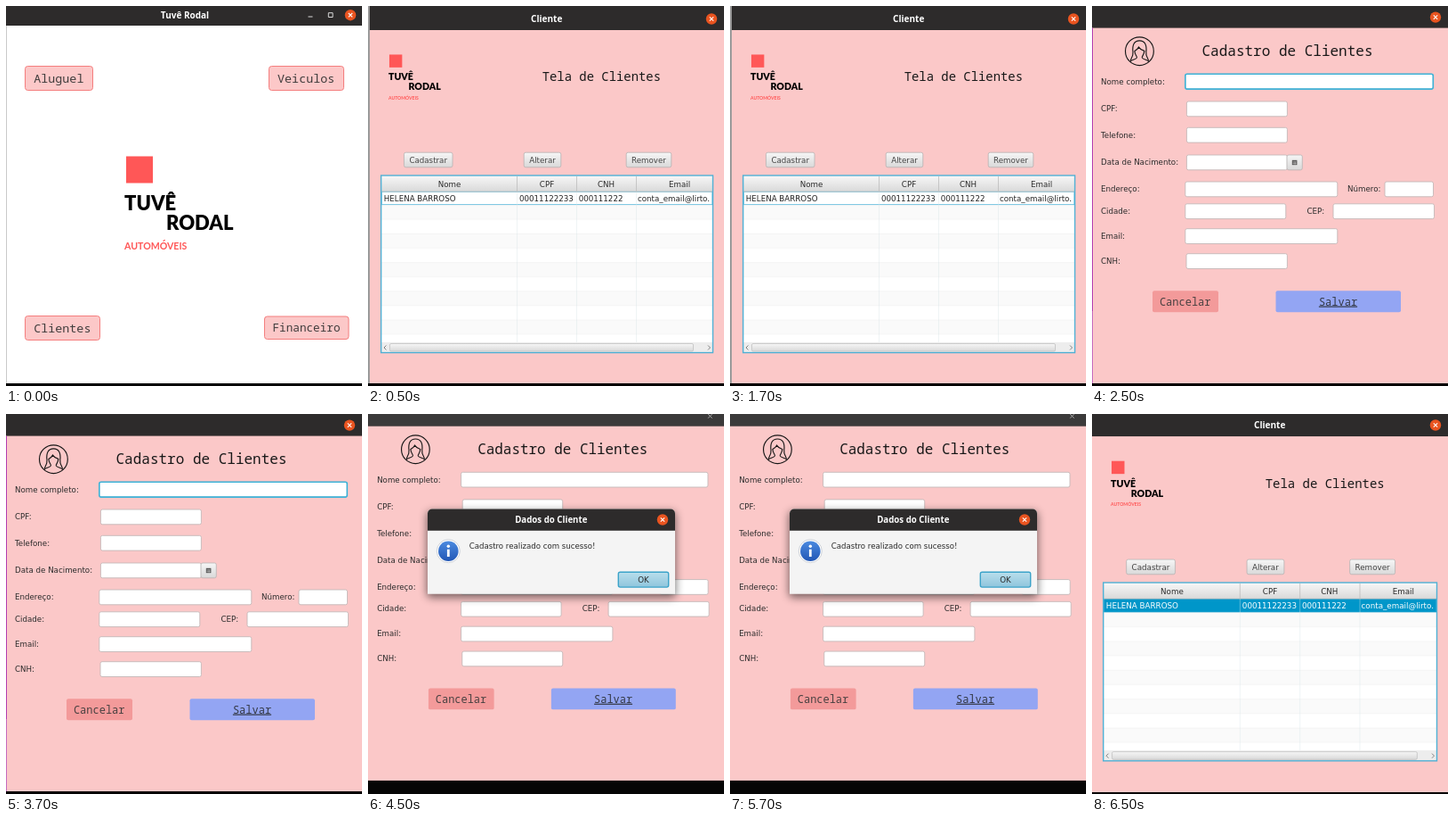
These frames come from a looping animation (400 px wide and 426 px high, 8000 ms). An HTML page:

```html
<!DOCTYPE html>
<html lang="pt-BR">
<head>
<meta charset="utf-8">
<title>Locadora</title>
<style>
  html, body { margin: 0; width: 100%; height: 100%; overflow: hidden; background: #000; }
  svg.stage { display: block; width: 100vw; height: 100vh; }
  text { font: 8.7px "DejaVu Sans", sans-serif; fill: #2a2a2a; }
  .title { font: bold 10px "Open Sans", sans-serif; fill: #fff; }
  .mono { font-family: "Noto Sans Mono", monospace; fill: #181818; }
  .brand { font: 900 22px Lato, sans-serif; fill: #000; }
  .tag { font: 700 10.6px Lato, sans-serif; fill: #ff5757; }
  .mid text, text.mid { text-anchor: middle; }
  .menu rect { fill: #fcc8c8; stroke: #f47e7e; }
  .menu text { font-size: 13.4px; fill: #403c3c; }
  .tool rect { fill: url(#grey); stroke: #b7b3b3; stroke-width: .8; }
  .tool text { fill: #444; }
  .field rect { fill: #fff; stroke: #c4b8b8; stroke-width: .9; }
  .cell { fill: currentColor; }

  .scene { visibility: hidden; animation: 8s step-end infinite; }
  #home { animation-name: home; }
  #list { animation-name: list; color: #222; --row: #fff; --edge: #6cc0de; }
  #entry { animation-name: entry; --bar: #2d2b2b; }
  #done { animation-name: done; --bar: #3b3a3a; }
  #picked { animation-name: picked; color: #fff; --row: #0096c9; --edge: #0096c9; }
  @keyframes home { 0% { visibility: visible } 6.25%, 100% { visibility: hidden } }
  @keyframes list { 0% { visibility: hidden } 6.25% { visibility: visible } 31.25%, 100% { visibility: hidden } }
  @keyframes entry { 0% { visibility: hidden } 31.25% { visibility: visible } 56.25%, 100% { visibility: hidden } }
  @keyframes done { 0% { visibility: hidden } 56.25% { visibility: visible } 81.25%, 100% { visibility: hidden } }
  @keyframes picked { 0% { visibility: hidden } 81.25%, 100% { visibility: visible } }
</style>
</head>
<body>
<svg class="stage" viewBox="0 0 400 426" preserveAspectRatio="none">
  <defs>
    <linearGradient id="grey" x2="0" y2="1"><stop stop-color="#f6f6f6"/><stop offset="1" stop-color="#d9d9d9"/></linearGradient>
    <linearGradient id="sky" x2="0" y2="1"><stop stop-color="#b9deec"/><stop offset="1" stop-color="#8fc5dc"/></linearGradient>
    <linearGradient id="info" x2="0" y2="1"><stop stop-color="#4b8ae0"/><stop offset="1" stop-color="#2257b5"/></linearGradient>
    <filter id="shade" x="-20%" y="-30%" width="140%" height="170%"><feGaussianBlur stdDeviation="5"/></filter>
    <pattern id="rows" x="0" y="222.8" width="400" height="32.2" patternUnits="userSpaceOnUse">
      <rect width="400" height="32.2" fill="#fff"/>
      <rect width="400" height="16.1" fill="#fafafa"/>
      <path d="M0 .3H400M0 16.4H400" stroke="#efefef" stroke-width=".7"/>
    </pattern>
    <clipPath id="grid"><rect x="15" y="191" width="372" height="197"/></clipPath>

    <g id="close">
      <circle r="6.2" fill="#e95420"/>
      <path d="M-2.2-2.2 2.2 2.2M2.2-2.2-2.2 2.2" stroke="#fff" stroke-width="1.1"/>
    </g>

    <g id="logo">
      <rect x="135" y="168.5" width="30" height="30" fill="#ff5757"/>
      <text class="brand" x="133" y="229">TUVÊ</text>
      <text class="brand" x="180" y="251">RODAL</text>
      <text class="tag" x="133" y="273">AUTOMÓVEIS</text>
    </g>

    <g id="clients">
      <rect x="2" width="400" height="423" fill="#fbc8c8"/>
      <rect x="2" width="400" height="27" fill="#2d2b2b"/>
      <text class="title mid" x="200.7" y="18">Cliente</text>
      <use href="#close" x="386" y="14.5"/>
      <use href="#logo" transform="translate(23 83.5) scale(.48) translate(-133 -229)"/>
      <text class="mono" x="195.7" y="84.3" style="font-size:13.9px">Tela de Clientes</text>
      <g class="tool mid">
        <rect x="40.5" y="164.2" width="54.5" height="16.6" rx="2"/><text x="67.7" y="175.8">Cadastrar</text>
        <rect x="175.2" y="164.2" width="41.6" height="16.6" rx="2"/><text x="196" y="175.8">Alterar</text>
        <rect x="290.2" y="164.2" width="50.6" height="16.6" rx="2"/><text x="315.5" y="175.8">Remover</text>
      </g>
      <rect x="14.5" y="190" width="373" height="198.5" fill="url(#rows)"/>
      <g clip-path="url(#grid)">
        <rect x="15" y="191" width="373" height="17" fill="url(#grey)"/>
        <rect x="15.6" y="208.3" width="371.2" height="14.3" fill="var(--row)" stroke="var(--edge)" stroke-width=".9"/>
        <path d="M167.5 208V377M234.5 208V377M301.5 208V377" stroke="#d8e4e8" stroke-width=".6" opacity=".7"/>
        <path d="M167.5 191V208M234.5 191V208M301.5 191V208M15 208H388" stroke="#bdbdbd" stroke-width=".8"/>
        <g class="mid">
          <text x="91.5" y="202.5">Nome</text><text x="201" y="202.5">CPF</text>
          <text x="267.5" y="202.5">CNH</text><text x="350" y="202.5">Email</text>
        </g>
        <text class="cell" x="17.8" y="218.5">HELENA BARROSO</text>
        <text class="cell" x="170" y="218.5">00011122233</text>
        <text class="cell" x="236.7" y="218.5">000111222</text>
        <text class="cell" x="303" y="218.5">conta_email@lirto.</text>
        <rect x="15" y="377" width="373" height="12" fill="#ededed"/>
        <rect x="24.5" y="378.5" width="341" height="8.6" rx="1.5" fill="url(#grey)" stroke="#bcbcbc" stroke-width=".7"/>
        <path d="M20.5 380.5 18 383l2.5 2.5M382 380.5l2.5 2.5-2.5 2.5" fill="none" stroke="#777" stroke-width=".9"/>
      </g>
      <rect x="14.7" y="190" width="372.8" height="198.6" fill="none" stroke="#4fb0d4" stroke-width="1.4"/>
    </g>

    <g id="form">
      <rect x="-1" width="404" height="423" fill="#fbc8c8"/>
      <rect x="-1" width="404" height="24.6" fill="var(--bar)"/>
      <g fill="none" stroke="#151515" stroke-width="1.15">
        <circle cx="53.4" cy="50.7" r="15.9"/>
        <path d="M43.5 61.5c-1-2 3.3-4 2.5-10-1-8 1.5-12.6 7.4-12.6s8.4 4.6 7.4 12.6c-.8 6 3.5 8 2.5 10"/>
        <path d="M42.8 62.5c2-2.8 6.8-2.2 7.6-4.6 .4-1.4-2.4-3.2-2.5-7.4 2-1 3.6-2.6 4.6-4.4 1.4 2.2 3.8 3.6 6.3 4.3-.2 4.2-2.9 6-2.5 7.5 .8 2.4 5.7 1.8 7.7 4.6"/>
      </g>
      <text class="mono" x="123.5" y="55.5" style="font-size:16px">Cadastro de Clientes</text>
      <text x="10" y="87.8">Nome completo:</text>
      <text x="10" y="118.4">CPF:</text>
      <text x="10" y="147.8">Telefone:</text>
      <text x="10" y="178.3">Data de Nacimento:</text>
      <text x="10" y="208.3">Endereço:</text>
      <text x="287" y="208.3">Número:</text>
      <text x="10" y="233">Cidade:</text>
      <text x="241.5" y="233">CEP:</text>
      <text x="10" y="261">Email:</text>
      <text x="10" y="289">CNH:</text>
      <g class="field">
        <rect x="104.8" y="76.3" width="278.5" height="16.8" rx="2"/>
        <rect x="106.4" y="107" width="113" height="16.8" rx="2"/>
        <rect x="106.4" y="136.3" width="113" height="16.8" rx="2"/>
        <rect x="106.4" y="167" width="113" height="16.8" rx="2"/>
        <rect x="104.8" y="197" width="171" height="16.8" rx="2"/>
        <rect x="329" y="197" width="54.5" height="16.8" rx="2"/>
        <rect x="104.8" y="221.8" width="113" height="16.8" rx="2"/>
        <rect x="271" y="221.8" width="113.5" height="16.8" rx="2"/>
        <rect x="104.8" y="249.7" width="171" height="16.8" rx="2"/>
        <rect x="106" y="277.7" width="113.4" height="16.8" rx="2"/>
      </g>
      <g class="tool"><rect x="219" y="167" width="17.3" height="16.8" rx="2"/></g>
      <path d="M224.8 172.8h5.6v5.4h-5.6z" fill="#555"/>
      <path d="M225.4 174.7h4.4M225.4 176.5h4.4M227 174.5v3.3M228.5 174.5v3.3" stroke="#ddd" stroke-width=".4"/>
      <rect x="68" y="319.2" width="74" height="24" rx="2" fill="#f39a9a"/>
      <rect x="206.5" y="319.2" width="140.5" height="24" rx="2" fill="#93a5f3"/>
      <g class="mid">
        <text class="mono" x="104.7" y="335.5" style="font-size:12px;fill:#484040">Cancelar</text>
        <text class="mono" x="276.5" y="335.5" style="font-size:12px;fill:#333845;text-decoration:underline">Salvar</text>
      </g>
    </g>
  </defs>

  <g id="home" class="scene">
    <rect width="400" height="423" fill="#fff"/>
    <rect width="400" height="22" fill="#2d2b2b"/>
    <path d="M.4 22V423" stroke="#b5b5b5" stroke-width=".8"/>
    <text class="title mid" x="201" y="13.5">Tuvê Rodal</text>
    <path d="M339.5 12h5M362.3 7.7h4.8v4.8h-4.8z" fill="none" stroke="#eee" stroke-width=".9"/>
    <use href="#close" x="387" y="10.2"/>
    <g class="menu mid">
      <rect x="21.5" y="67.5" width="76" height="27" rx="3"/><text class="mono" x="59.3" y="85.8">Aluguel</text>
      <rect x="295.5" y="67.5" width="84" height="27" rx="3"/><text class="mono" x="337.2" y="85.8">Veiculos</text>
      <rect x="21.5" y="347.5" width="84" height="27" rx="3"/><text class="mono" x="63.3" y="365.8">Clientes</text>
      <rect x="290.5" y="348" width="94.5" height="25.5" rx="3"/><text class="mono" x="337.5" y="365.3" style="font-size:12.7px">Financeiro</text>
    </g>
    <use href="#logo"/>
  </g>

  <g id="list" class="scene">
    <rect width="2" height="423" fill="#9a9a9a"/>
    <use href="#clients"/>
  </g>

  <g id="entry" class="scene">
    <use href="#form"/>
    <rect y="24.6" width="1" height="318" fill="#b23fb2"/>
    <rect y="342.6" width="1" height="80.4" fill="#c56cc0"/>
    <use href="#close" x="386" y="12.6"/>
    <rect x="104.8" y="76.3" width="278.5" height="16.8" rx="2" fill="none" stroke="#3fb3d8" stroke-width="1.6"/>
  </g>

  <g id="done" class="scene">
    <rect width="400" height="426" fill="#050505"/>
    <use href="#form" transform="matrix(.996 0 0 .997 .2 -10.8)"/>
    <path d="M382.2 .2l4.4 4.4M386.6 .2l-4.4 4.4" stroke="#aaa"/>
    <rect x="66" y="109" width="280" height="97" rx="5" opacity=".5" filter="url(#shade)"/>
    <path d="M67 201.7V111.5a5 5 0 0 1 5-5H340a5 5 0 0 1 5 5V201.7z" fill="#f4f4f4"/>
    <path d="M67 130.7V111.5a5 5 0 0 1 5-5H340a5 5 0 0 1 5 5V130.7z" fill="#2d2b2b"/>
    <text class="title mid" x="205.8" y="122" style="font-size:9.7px">Dados do Cliente</text>
    <use href="#close" x="331" y="118.5"/>
    <circle cx="90.3" cy="153.7" r="13" fill="#fff" stroke="#c3c8d0" stroke-width=".8"/>
    <circle cx="90.3" cy="153.7" r="11.3" fill="url(#info)"/>
    <circle cx="90.3" cy="148.3" r="1.7" fill="#fff"/>
    <path d="M90.3 151.7V160" stroke="#fff" stroke-width="2.8"/>
    <text x="113.7" y="151.3" style="font-size:8.6px">Cadastro realizado com sucesso!</text>
    <rect x="281.3" y="177.3" width="56.4" height="16.8" rx="2" fill="url(#sky)" stroke="#3ba3c9" stroke-width="1.4"/>
    <text class="mid" x="309.5" y="189">OK</text>
  </g>

  <g id="picked" class="scene">
    <rect width="400" height="424" fill="#fbc8c8"/>
    <use href="#clients" transform="matrix(1.0053 0 0 1.006 -2.07 -2.1)"/>
  </g>
</svg>
</body>
</html>
```
